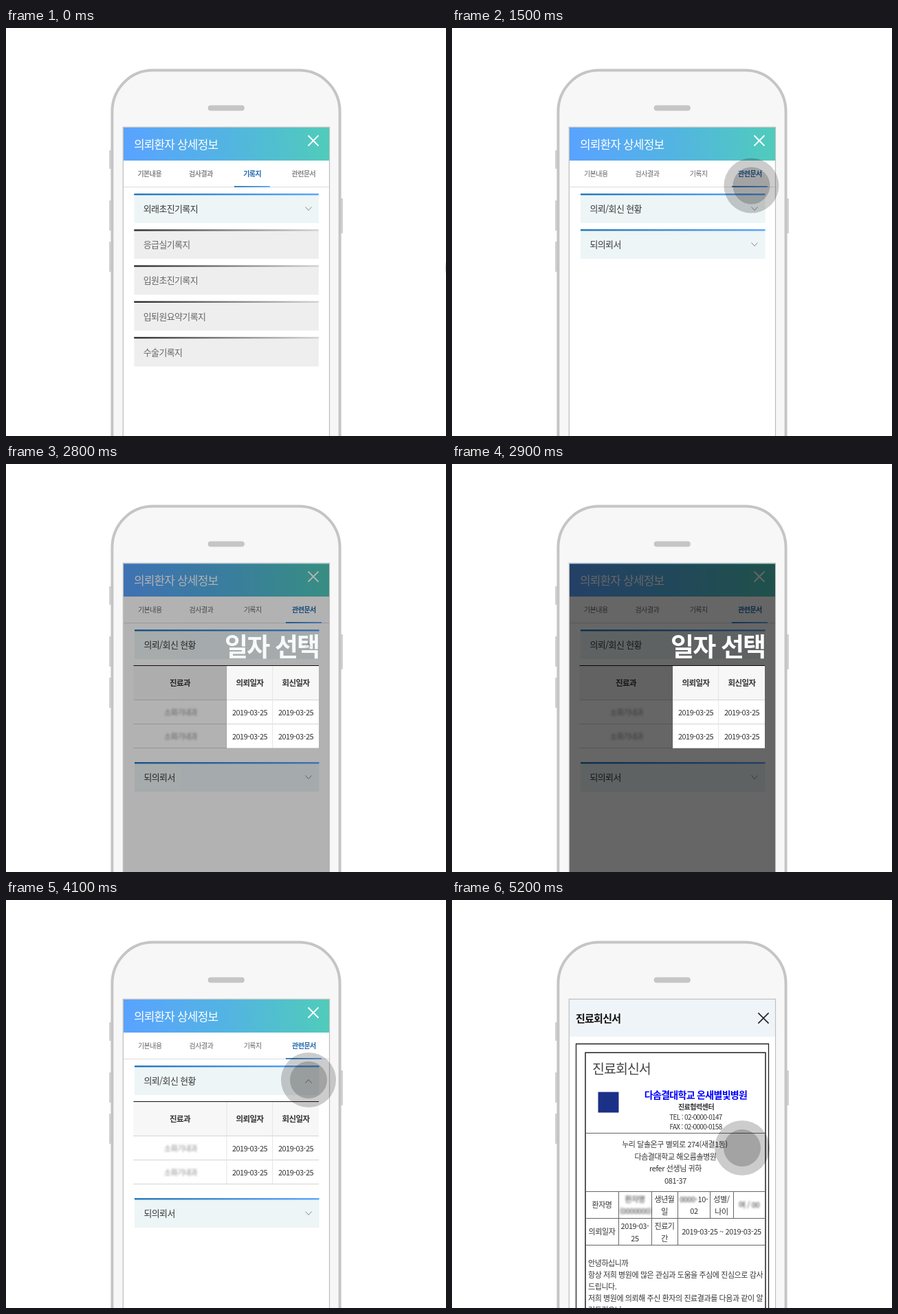
These frames come from a looping animation (640 px wide and 594 px high, 6700 ms). An HTML page:

```html
<!DOCTYPE html>
<html lang="ko">
<head>
<meta charset="utf-8">
<title>진료회신서</title>
<style>
html, body { margin: 0; width: 100%; height: 100%; overflow: hidden; background: #fff; }
svg { display: block; width: 640px; height: 594px; }
text { font-family: "Noto Sans CJK KR", "Noto Sans CJK", "Noto Sans KR", sans-serif; letter-spacing: -.05em; }
.mid { text-anchor: middle; }
.doc { font-size: 11px; letter-spacing: -.42px; fill: #333; }
.tel { font-size: 10px; letter-spacing: -.65px; fill: #333; }
.blur { filter: blur(1.8px); }
</style>
</head>
<body>
<svg id="stage" viewBox="0 0 640 594"></svg>
<script>
const LOOP = 6700;
const stage = document.getElementById('stage');

const text = (x, y, size, str, fill = '#333', weight = 400, cls = '') =>
  `<text x="${x}" y="${y}" font-size="${size}" fill="${fill}" font-weight="${weight}" class="${cls}">${str}</text>`;
const mid = (x, y, size, str, fill, weight, cls = '') => text(x, y, size, str, fill, weight, 'mid ' + cls);
const doc = (x, y, str, cls = 'mid') => `<text x="${x}" y="${y}" class="doc ${cls}">${str}</text>`;
const rect = (x, y, w, h, fill, extra = '') =>
  `<rect x="${x}" y="${y}" width="${w}" height="${h}" fill="${fill}" ${extra}/>`;
const line = (d, stroke, width = 1, extra = '') =>
  `<path d="${d}" fill="none" stroke="${stroke}" stroke-width="${width}" ${extra}/>`;
const group = (id, body) => `<g id="${id}">${body}</g>`;
const gradient = (id, stops, extra = '') =>
  `<linearGradient id="${id}" ${extra}>${stops.map((c, i) =>
    `<stop offset="${i / (stops.length - 1)}" stop-color="${c}"/>`).join('')}</linearGradient>`;
const chevron = (y, dir) => line(`M435.5 ${y - 2.5 * dir}l4.5 ${5 * dir}l4.5 ${-5 * dir}`, '#888');
const cross = (x, y, r, stroke, width) =>
  line(`M${x - r} ${y - r}L${x + r} ${y + r}M${x + r} ${y - r}L${x - r} ${y + r}`, stroke, width);

function item(x, y, label, active) {
  const w = 268.5;
  return rect(x, y, w, 43, active ? '#edf5f6' : '#eee') +
    rect(x, y, w, 2.4, active ? 'url(#blue)' : 'url(#dark)') +
    text(x + 13.5, y + 27, 13, label, active ? '#3a3a3a' : '#666');
}

function tabs(active, dx, idle, weight) {
  return ['기본내용', '검사결과', '기록지', '관련문서'].map((name, i) =>
    mid(208.8 + 74.7 * i + dx, 216, 10, name, i === active ? '#1f67ab' : idle, i === active ? 700 : weight)
  ).join('') + rect(332 + 75 * (active - 2), 230, 52, 1.8, 'url(#blue)');
}

const phone =
  [[150, 178, 27], [150, 251, 44], [150, 311, 44], [486, 248, 51]].map(([x, y, h]) =>
    rect(x, y, 4, h, '#d2d2d2', 'rx="1"')).join('') +
  `<path d="M154.4 600V122C154.4 88 181 61.6 214 61.6H426C459 61.6 485.6 88 485.6 122V600"
    fill="#f7f7f7" stroke="#c5c5c5" stroke-width="4"/>` +
  rect(293.7, 112.5, 53.2, 8, '#c5c5c5', 'rx="4"') +
  rect(170.3, 144.3, 300.2, 460, '#fff', 'stroke="#bdbdbd" stroke-width="1.2"');

const header =
  rect(171, 145, 299, 48, 'url(#sky)') +
  text(186, 175.5, 17, '의뢰환자 상세정보', '#fff') +
  cross(447, 164, 7.5, '#fff', 1.8) +
  line('M171 231.5H470', '#ddd');

const records = tabs(2, 0, '#888', 700) +
  ['외래초진기록지', '응급실기록지', '입원초진기록지', '입퇴원요약기록지', '수술기록지'].map((name, i) =>
    item(186.3, 241 + 52.2 * i, name, i === 0)).join('') +
  chevron(263, 1);

const table =
  rect(185.5, 293, 269.5, 50, '#f7f7f7') +
  line('M185.5 293.5H455', '#111') +
  line('M185.5 343.5H455M185.5 378.5H455M185.5 413.5H455', '#d4d4d4') +
  line('M321 294V413M387.7 294V413', '#e3e3e3') +
  mid(253, 323, 11.5, '진료과', '#333', 700) +
  mid(354.5, 323, 11.5, '의뢰일자', '#333', 700) +
  mid(421.5, 323, 11.5, '회신일자', '#333', 700) +
  [365.5, 400.5].map(y =>
    mid(254, y, 11, '소화기내과', '#888', 500, 'blur') +
    mid(354.5, y, 11, '2019-03-25') + mid(421.5, y, 11, '2019-03-25')).join('');

const papers = tabs(3, .5, '#666', 500) +
  item(187, 241, '의뢰/회신 현황', true) +
  group('closed', chevron(263, 1)) + group('open', chevron(264, -1)) +
  `<g clip-path="url(#reveal)">${table}</g>` +
  group('second', item(187, 293, '되의뢰서', true) + chevron(315, 1));

const dim =
  `<path d="M171 145.5H470V594H171ZM321 294V414H455V294Z" fill="#000" fill-opacity=".6" fill-rule="evenodd"/>` +
  text(318, 279.7, 37, '일자 선택', '#fff', 700) +
  group('frame', rect(319, 292, 138, 124, 'none', 'stroke="#f02020" stroke-width="4"'));

const letter =
  rect(171, 145, 299, 449, '#fff') + rect(171, 145, 299, 54, '#eef4f8') +
  text(180, 177.8, 15, '진료회신서', '#111', 700) +
  cross(453, 172, 7.6, '#222', 1.6) +
  line('M180.5 600V209.5H460.5V600', '#222', 1.3) +
  line('M194 600V222.2H456V600', '#222', 1.5) +
  line('M194 339.5H456M194 424.5H456M194 463.5H456M194 502.5H456' +
    'M242.5 424V502M290.5 424V502M328.5 424V502M375.5 424V463M409.5 424V463', '#666') +
  text(204, 253, 19.5, '진료회신서', '#444') +
  rect(212.5, 279.5, 30, 30, '#1b3087') +
  mid(354.5, 289, 14, '다솜결대학교 온새별빛병원', '#00f', 700) +
  mid(355, 304.7, 10, '진료협력센터', '#333', 700) +
  `<text x="354.5" y="319.7" class="tel mid">TEL : 02-0000-0147</text>` +
  `<text x="354.5" y="334.2" class="tel mid">FAX : 02-0000-0158</text>` +
  doc(324, 360, '누리 달솔온구 별뫼로 274(새결1동)') +
  doc(325, 377.5, '다솜결대학교 해오름솔병원') +
  doc(325, 395, 'refer 선생님 귀하') +
  doc(325, 412.8, '081-37') +
  doc(218, 448, '환자명') +
  doc(266, 440, '환자명', 'mid blur') + doc(267, 457, '(0000000)', 'mid blur') +
  doc(309, 440, '생년월') + doc(309, 457.5, '일') +
  doc(344, 440, '0000-', 'mid blur') + doc(365, 440, '10-') + doc(352, 457, '02') +
  doc(392, 440, '성별/') + doc(392, 457.5, '나이') +
  doc(432, 448, '여 / 00', 'mid blur') +
  doc(218, 487, '의뢰일자') +
  doc(266, 479, '2019-03-') + doc(266, 496.5, '25') +
  doc(309, 479, '진료기') + doc(309, 496.5, '간') +
  doc(392, 487, '2019-03-25 ~ 2019-03-25') +
  ['안녕하십니까', '항상 저희 병원에 많은 관심과 도움을 주심에 진심으로 감사', '드립니다.',
    '저희 병원에 의뢰해 주신 환자의 진료결과를 다음과 같이 알', '려드리오니'].map((row, i) =>
    doc(198, 532.5 + 17.2 * i, row, '')).join('');

stage.innerHTML = `<defs>
  ${gradient('sky', ['#59a3ff', '#53b4e2', '#50cbbb'], 'gradientUnits="userSpaceOnUse" x1="176" y1="180" x2="466" y2="158"')}
  ${gradient('blue', ['#2277bb', '#58a6ff'])}
  ${gradient('dark', ['#2c2c2c', '#d4d4d4'])}
  <clipPath id="reveal"><rect id="slot" x="180" y="290" width="280" height="0"/></clipPath>
  </defs>` + phone + header + group('records', records) + group('papers', papers) +
  group('dim', dim) + group('letter', letter) +
  group('touch', '<circle r="40" fill-opacity=".2"/><circle r="27" fill-opacity=".2"/>');

const el = {};
stage.querySelectorAll('[id]').forEach(n => el[n.id] = n);

// time, x, y: each move takes four steps of 100 ms
const moves = [[500, 433, 212], [1500, 440, 262], [4600, 411, 361]];
const dimSteps = [[2800, .5], [2900, 1], [3900, .5], [4100, 0]];
const letterSteps = [[5100, .5], [5200, 1]];

const stepped = (t, steps) => steps.reduce((v, [at, next]) => t >= at ? next : v, 0);
function progress(t, start) {
  if (t < start) return 0;
  const k = Math.min(4, Math.floor((t - start) / 100) + 1) / 4;
  return 1 - (1 - k) ** 1.5;
}
const show = (node, on) => node.setAttribute('visibility', on ? 'visible' : 'hidden');

function draw(t) {
  let x = 679, y = 349;
  for (const [at, tx, ty] of moves) {
    const p = progress(t, at);
    x += (tx - x) * p;
    y += (ty - y) * p;
  }
  if (t >= 5100) x = 422;
  el.touch.setAttribute('transform', `translate(${x} ${y})`);
  show(el.touch, t < 2800 || t >= 4100);

  show(el.records, t < 1000);
  el.papers.setAttribute('display', t >= 1000 ? 'inline' : 'none');
  show(el.closed, t < 2000);
  show(el.open, t >= 2000);
  const drop = 141 * progress(t, 2000);
  el.slot.setAttribute('height', drop);
  el.second.setAttribute('transform', `translate(0 ${drop})`);

  const shade = stepped(t, dimSteps);
  el.dim.setAttribute('opacity', shade);
  el.dim.setAttribute('display', shade ? 'inline' : 'none');
  show(el.frame, t >= 3100 && t < 3900 && Math.floor((t - 3100) / 200) % 2 === 0);

  const page = stepped(t, letterSteps);
  el.letter.setAttribute('opacity', page);
  el.letter.setAttribute('display', page ? 'inline' : 'none');
}

const start = performance.now();
function tick() {
  draw((performance.now() - start) % LOOP);
  requestAnimationFrame(tick);
}
tick();
</script>
</body>
</html>
```
